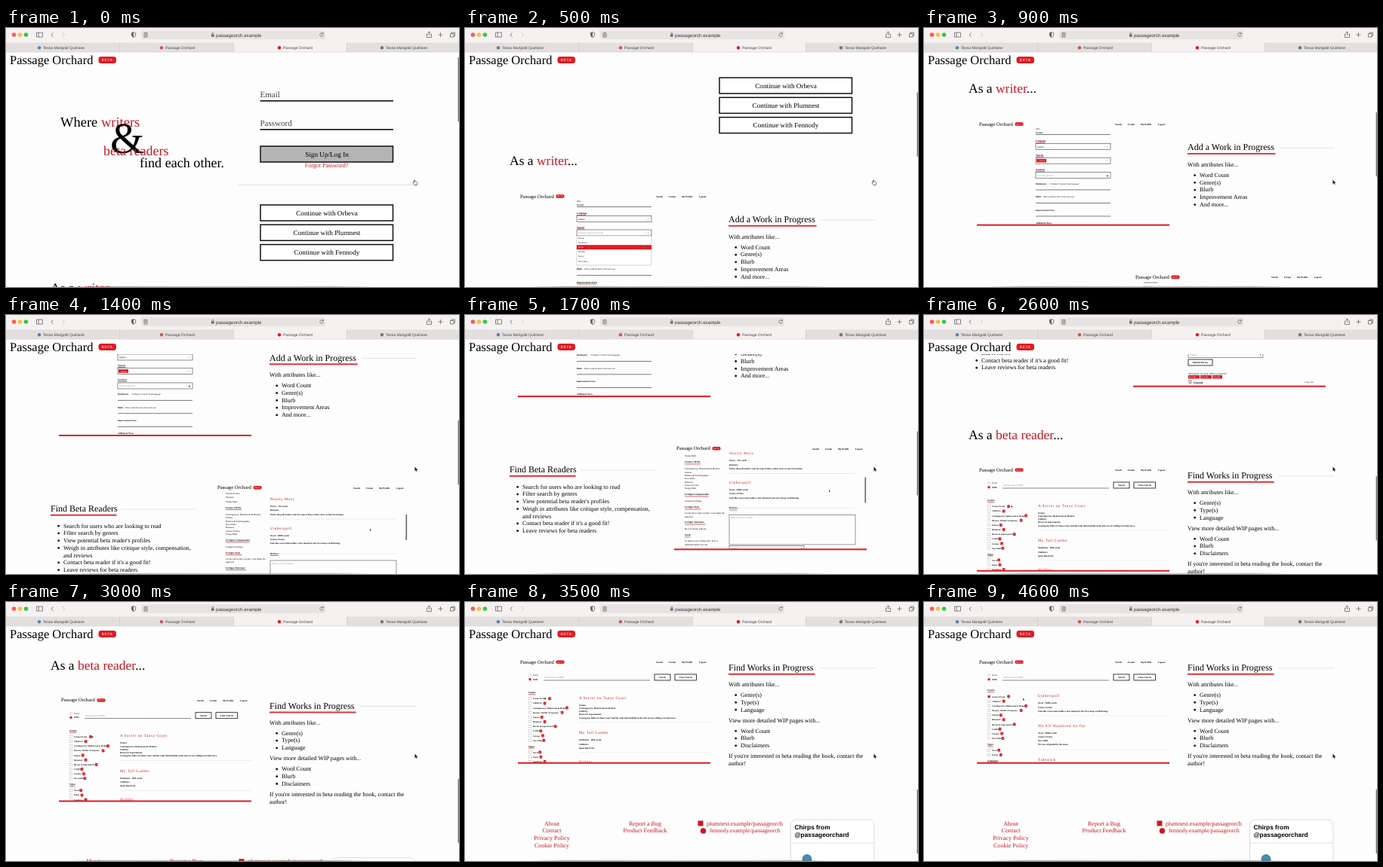
These frames come from a looping animation (600x344 px, 4700 ms). An HTML page:

```html
<!DOCTYPE html>
<html lang="en">
<head>
<meta charset="utf-8">
<title>Passage Orchard</title>
<style>
  html, body { margin: 0; width: 100%; height: 100%; overflow: hidden; background: #fdfdfd; }
  svg { display: block; width: 100vw; height: 100vh; }
  text { font-family: "Liberation Serif", serif; text-rendering: geometricPrecision; white-space: pre; }
  .ui { font-family: "Liberation Sans", sans-serif; }
  .mid { text-anchor: middle; }
  .bold { font-weight: bold; }
  .red { fill: #cb1822; }
  .title { fill: #cb1822; letter-spacing: .6px; }
  .pale { fill: #888; }
  .icon { fill: none; stroke: #666; stroke-width: .8; }
</style>
</head>
<body>
<svg id="stage" viewBox="0 0 600 344"></svg>
<script>
const RED = '#e21a23', INK = '#111', LOOP = 4700, STEP = 100;
const BRAND = 'Passage Orchard', PERSON = 'Tessa Marigold Quinlane', SITE = 'passageorch.example';

const text = (x, y, s, size = 8, cls = '', extra = '') =>
  `<text x="${x}" y="${y}" font-size="${size}" class="${cls}" ${extra}>${s.replace(/&/g, '&amp;')}</text>`;
const rect = (x, y, w, h, fill, extra = '') =>
  `<rect x="${x}" y="${y}" width="${w}" height="${h}" fill="${fill}" ${extra}/>`;
const frame = (x, y, w, h, line = .6, color = INK, fill = 'none') =>
  rect(x, y, w, h, fill, `stroke="${color}" stroke-width="${line}"`);
const rule = (x1, x2, y, color = '#ddd', w = .8) => rect(x1, y - w / 2, x2 - x1, w, color);
const dot = (x, y, r, fill, extra = '') => `<circle cx="${x}" cy="${y}" r="${r}" fill="${fill}" ${extra}/>`;
const path = (d, extra = 'class="icon"') => `<path d="${d}" ${extra}/>`;
const shift = (y, body, id = '') => `<g transform="translate(0 ${y})" ${id && `id="${id}"`}>${body}</g>`;
const rows = (x, y, step, items, draw) => items.map((s, i) => draw(x, y + i * step, s)).join('');
const tiny = (x, y, s) => text(x, y + 1, s, 3);
const tinyBold = (x, y, s) => text(x, y + 1, s, 2.9, 'bold');
const bullet = (x, y, s) => dot(x - 6.3, y - 2.3, 1.4, INK) + text(x, y, s);
const bullets = (x, y, items) => rows(x, y, 9.75, items, bullet);
const arrow = (s = 1) => `<path transform="scale(${s})" d="M0 0V6.4L1.5 5.1L2.5 7.3L3.5 6.8L2.5 4.8H4.4Z" fill="#111" stroke="#fff" stroke-width=".4"/>`;

function heading(x, y, s, width, ruleEnd) {
  return text(x, y, s, 12) + rule(x, x + width, y + 4.8, RED, 1.7) + rule(x + width + 6, ruleEnd, y - 3);
}

function label(x, y, s) {
  return text(x, y + 1, s, 3.2, 'bold') + rule(x, x + s.length * 1.5, y + 2.5, RED, .7);
}

function badge(x, y, w, h, size) {
  return rect(x, y, w, h, RED, `rx="${h * .38}"`) +
    text(x + w / 2, y + h * .7, 'BETA', size, 'ui mid', `fill="#fff" letter-spacing="${size * .18}"`);
}

// A framed recording: site header on top, clipped body below, red bar at the bottom.
function video(id, x, bottom, body) {
  const y = bottom - 132;
  const nav = [[183, 'Search'], [200, 'Forum'], [217, 'My Profile'], [240, 'Logout']];
  return `<clipPath id="${id}">${rect(x, bottom - 129, 255, 129, INK)}</clipPath>
    <g clip-path="url(#${id})">${body}</g>` +
    text(x + 3, y, BRAND, 6.7) + badge(x + 50.5, y - 4.3, 11, 4.6, 2.4) +
    nav.map(([dx, s]) => text(x + dx, y - .5, s, 3.1, 'bold')).join('') +
    rule(x, x + 255, bottom, RED, 2);
}

function formVideo() {
  const area = (y, s, hint) => tinyBold(148, y, s) + text(148 + s.length * 1.55, y + 1, hint, 2.7) + rule(148, 247, y + 8.3, '#444', .7);
  const select = (y, s, cls = '') => frame(148, y, 99, 8, .6, '#444') + text(150, y + 5, s, 2.8, cls) +
    text(239, y + 5.2, '×  ▾', 2.8, 'pale');
  const shared = tiny(148, 230, 'Title') + tinyBold(148, 235, 'Second') + rule(148, 247, 237.5, '#444', .7) +
    label(148, 246, 'Language') + select(249.5, 'English') + label(148, 264.5, 'Type(s)');
  const option = (x, y, s) => s === 'Novel'
    ? rect(148, y - 3, 99, 6, RED) + text(x, y + 1, s, 2.8, '', 'fill="#fff"') : text(x, y + 1, s, 2.8);
  const open = select(268, 'Select the type(s) of the work', 'pale') + frame(148, 276, 99, 39, .5, '#aaa', '#fff') +
    rows(150, 279, 6.1, ['Fiction', 'Nonfiction', 'Novel', 'Novella', 'Poetry', 'Short Story'], option) +
    area(320, 'Blurb', ' - What would the back of the book say?') + label(148, 337.5, 'Improvement Areas') +
    `<g transform="translate(237 289)">${arrow(.45)}</g>`;
  const closed = select(268, '') + rect(149, 269.7, 13, 4.6, RED) + text(151, 273, '× Novel', 2.7, '', 'fill="#fff"') +
    label(148, 283.5, 'Genre(s)') + select(287.5, 'Select the genre(s)', 'pale') + dot(243, 292.3, 1.3, '#888') +
    area(302.5, 'Disclaimers', ' - Profanity? Violent? Foul language?') +
    area(320, 'Blurb', ' - What would the back of the book say?') +
    area(337.5, 'Improvement Areas', '') + tinyBold(148, 354.5, 'Additional Notes');
  return video('form', 70, 526.5, shift(169, shared + `<g id="formOpen">${open}</g><g id="formClosed">${closed}</g>`));
}

function entry(x, y, title, lines, gap = 5) {
  return text(x, y + 1.7, title, 5, 'title') + rows(x, y + 9.8, gap, lines, tinyBold);
}

function profileVideo() {
  const side = rows(291, 236.5, 5.5, ['Science Fiction', "Women's", 'Young Adult'], tiny) + label(291, 256, 'Genres I Write') +
    rows(291, 265, 4.33, ['Contemporary, Mainstream & Modern', 'Fantasy', 'Memoir & Autobiography', 'New Adult', 'Romance',
      'Science Fiction', 'Young Adult'], tiny) +
    label(291, 299, 'Critique Compensation') + tiny(291, 308, 'Critique Exchange') +
    label(291, 316, 'Critique Style') + rows(291, 324, 4.2, ['Let me know what you like. I can adjust my', 'approach.'], tiny) +
    label(291, 336, 'Critique Tolerance') + tiny(291, 344.5, 'Be very honest with me.') +
    label(291, 353, 'Goals') + rows(291, 361, 4.2, ['To improve my writing skill. To be a', 'published author one day.'], tiny);
  const tags = [350, 366, 382].map(x => rect(x, 394, x > 380 ? 13 : 15, 4.5, RED) +
    text(x + 1, 397.2, 'Friendly', 2.8, '', 'fill="#fff"')).join('');
  const main = entry(350, 244, 'Nearly Moss', ['Poetry - 350 words', 'Romance', "Where the path bends I wait for some of those echoes since we have been home."], 5.4) +
    rule(350, 517, 271, '#ddd', .6) +
    entry(350, 283, 'Umberquill', ['Novel - 50000 words', 'Science Fiction', 'Feels like a slow lantern like a slow lantern by the river keeps on flickering.'], 5.2) +
    label(350, 317, 'Reviews') + rule(364, 517, 317, '#ddd', .5) +
    frame(350, 326, 167, 39.5, .6, '#555') + text(352, 331, 'Write a review for them', 3, 'pale') +
    frame(350, 367, 99, 7.5, .6, '#555') + text(352, 372, 'Type(s)', 3, 'pale') + text(445, 372, '▾', 3) +
    frame(350, 377, 32, 8, .8) + text(366, 382.2, 'Submit Review', 3.2, 'mid bold') +
    tiny(350, 396 - 9.5 + 9.5 - 4.5, '') + shift(4, text(350, 392.5, '“Honest but not mean. 100% recommend.”', 3) + tags +
      frame(351, 401, 3, 3.6, .5) + text(357, 404.5, 'Osmund', 3.4, 'bold') + text(504, 404, '19 Apr 2021', 2.5));
  return video('profile', 277, 729.7, shift(366.5, `<g id="profileBody">${side + main}</g>` +
    rect(529.5, 265, 1.6, 34, '#666', 'id="profileThumb"') + `<g transform="translate(482 284)">${arrow(.45)}</g>`));
}

function searchVideo() {
  const GENRES = ['Science Fiction', "Children's", 'Contemporary, Mainstream & Modern', 'Mystery, Thriller & Suspense', 'Fantasy',
    'Historical', 'Horror & Supernatural', 'LGBTQ+', 'Literary', 'New Adult'];
  const check = (x, y, s) => frame(x - 5.5, y - 1.7, 3.4, 3.4, .4, '#aaa', '#fff') + text(x, y + 1, s, 2.7, 'bold') +
    rect(x + 1 + s.length * 1.28, y - 2, 3.6, 4, RED, 'rx="1"') + text(x + 2.8 + s.length * 1.28, y + 1, '1', 2.6, 'mid', 'fill="#fff"');
  const sidebar = (y, types) => label(84, y, 'Genres') + rows(90, y + 8.3, 6.15, GENRES, check) +
    label(84, y + 71.5, 'Types') + rows(90, y + 79.5, 6.2, types, check);
  const bar = dot(86, 223, 1.5, '#fff', 'stroke="#aaa" stroke-width=".5"') + tiny(90, 223, 'Users') +
    dot(86, 228.7, 1.7, RED) + tinyBold(90, 228.7, 'WIPs') +
    text(105, 227, 'Search posts or WIPs', 3.1, 'pale') + rule(104, 245, 230, '#555', .7) +
    frame(251, 222, 21, 8, .8) + text(261.5, 227, 'Search', 3.1, 'mid bold') +
    frame(278, 222, 28.5, 8, .8) + text(292.2, 227, 'Clear Search', 3.1, 'mid bold');
  const before = sidebar(246, ['Novel', 'Poetry', 'Nonfiction']) +
    entry(151, 253, 'A Secret on Tansy Court', ['Fiction', 'Contemporary, Mainstream & Modern', 'LGBTQ+', 'Horror & Supernatural',
      'A young boy hides on Tansy Court and the souls that find him in the attic are not willing to let him leave.'], 4.2) +
    rule(151, 325, 286, '#ddd', .5) +
    entry(151, 299.5, 'My Tall Ladder', ['Nonfiction - 1000 words', "Children's", 'Quiet Rural Life'], 5.2) +
    rule(151, 325, 326, '#ddd', .5) + entry(151, 338, 'Hidden', []);
  const after = sidebar(243.3, ['Novel', 'Fiction']) + rect(84.8, 250.2, 2.8, 2.8, '#b01820') + label(84, 336.5, 'Languages') +
    entry(151, 250.5, 'Umberquill', ['Novel - 50000 words', 'Science Fiction', 'Feels like a slow lantern like a slow lantern by the river keeps on flickering.'], 5.4) +
    rule(151, 325, 277, '#ddd', .5) +
    entry(151, 290.5, 'We All Wandered So Far', ['Novel - 90000 words', 'Science Fiction', 'New Adult', 'We were all guided by the moon.'], 5) +
    rule(151, 325, 322, '#ddd', .5) + entry(151, 335, 'Tidewick', []);
  return video('search', 70, 974.8, shift(635, bar + `<g id="before">${before}</g><g id="after">${after}</g>
    <g id="pointer">${arrow(.5)}</g>`));
}

function pageMarkup() {
  const button = (y, s, fill = '#fff') => frame(337, y, 175.5, 21, 1.5, INK, fill) + text(425, y + 13.6, s, 9.2, 'mid');
  const field = (y, s) => text(336.5, y, s, 11, '', 'fill="#444"') + rule(336.5, 513, y + 4.8, INK, 1.6);
  const links = (x, items) => rows(x, 1057.5, 9.75, items, (a, y, s) => text(a, y, s, 8.1, 'mid red'));
  const asA = (y, s) => text(59, y, `As a <tspan class="red">${s}</tspan>...`, 17.5);
  return field(92, 'Email') + field(130, 'Password') + button(157, 'Sign Up/Log In', '#b4b4b4') +
    text(424.5, 185, 'Forgot Password?', 8, 'mid red') + rule(307, 545, 208.5) +
    button(235, 'Continue with Orbeva') + button(261.3, 'Continue with Plumnest') + button(287.6, 'Continue with Fennody') +
    text(72, 130.5, 'Where <tspan class="red">writers</tspan>', 18.5) + text(138, 165.5, '&', 58) +
    text(129, 169, 'beta readers', 18, 'red') + text(177, 185, 'find each other.', 18.1) +
    asA(351, 'writer') + formVideo() +
    heading(349, 427, 'Add a Work in Progress', 116.5, 543) + text(349, 448.7, 'With attributes like...') +
    bullets(365, 462.7, ['Word Count', 'Genre(s)', 'Blurb', 'Improvement Areas', 'And more...']) +
    heading(59, 627.5, 'Find Beta Readers', 87.5, 253) +
    bullets(76, 649, ['Search for users who are looking to read', 'Filter search by genres', "View potential beta reader's profiles",
      'Weigh in attributes like critique style, compensation,']) + text(76, 688, 'and reviews') +
    bullets(76, 697.7, ["Contact beta reader if it's a good fit!", 'Leave reviews for beta readers']) + profileVideo() +
    asA(800, 'beta reader') + searchVideo() +
    heading(349, 852, 'Find Works in Progress', 114.5, 543) + text(349, 873, 'With attributes like...') +
    bullets(365, 887, ['Genre(s)', 'Type(s)', 'Language']) + text(349, 920.6, 'View more detailed WIP pages with...') +
    bullets(365, 934.6, ['Word Count', 'Blurb', 'Disclaimers']) +
    text(349, 968.2, "If you're interested in beta reading the book, contact the") + text(349, 978, 'author!') +
    links(115, ['About', 'Contact', 'Privacy Policy', 'Cookie Policy']) + links(238.5, ['Report a Bug', 'Product Feedback']) +
    rect(308.5, 1051.5, 7, 7, '#cb1822') + text(320, 1057.5, 'plumnest.example/passageorch', 8.1, 'red') +
    dot(315.5, 1065, 3.7, '#cb1822') + text(324, 1067.2, 'fennody.example/passageorch', 7.8, 'red') +
    rect(431.5, 1050, 110.5, 120, '#fff', 'rx="7" stroke="#d5d9dc" stroke-width=".9"') +
    text(436.5, 1063.3, 'Chirps from', 8.3, 'ui bold') + text(436.5, 1073.4, '@passageorchard', 8.3, 'ui bold') +
    rule(431.5, 542, 1081, '#d5d9dc', .8) + dot(453, 1102.5, 6.5, '#4b8ba8');
}

function chromeMarkup() {
  const tab = (x, s, mark) => dot(x, 26.2, 2.2, mark) + text(x + 5, 28, s, 5, 'ui', 'fill="#444"');
  return rect(0, 32, 600, 20, '#fdfdfd') + text(5, 47.5, BRAND, 16.5) + badge(122.5, 38, 23.5, 9, 4.6) +
    rect(0, 0, 600, 32, '#f5f1f0') + rect(0, 19.5, 301, 12.5, '#e3dfde') + rect(451, 19.5, 149, 12.5, '#e3dfde') +
    [150, 301, 451].map(x => rect(x, 19.5, .7, 12.5, '#cfcaca')).join('') + rule(0, 600, 32, '#d2cecd', .6) +
    ['#fc5b57', '#fdbc40', '#34c748'].map((c, i) => dot(10.5 + i * 8, 9, 2.8, c)).join('') +
    path('M40.5 6h8v6h-8zM43.2 6v6M62.5 6.2L60 9l2.5 2.8') + path('M75 6.2L77.5 9L75 11.8', 'fill="none" stroke="#bbb" stroke-width=".8"') +
    path('M169 5.5l2.7 1v2.6q0 2.3-2.7 3.5q-2.7-1.2-2.7-3.5V6.500z') + path('M169 5.5v7.100q-2.700-1.200-2.700-3.500V6.500z', 'fill="#666"') +
    rect(179, 3.3, 244, 11.7, '#e7e3e2', 'rx="3"') +
    path('M183 6.500h4v5.500h-4zM184 8.300h2M184 10h2M420 7.600a2.300 2.300 0 1 0 .3 2M420.300 6v1.900h-1.900') +
    rect(272, 8.500, 3.600, 3, '#666') + path('M272.700 8.500v-1a1.100 1.100 0 0 1 2.200 0v1') +
    text(278, 11.5, SITE, 6.2, 'ui', 'fill="#333"') +
    path('M559 8h-1.500v4.500h6V8h-1.500M560.500 10V4.800M558.800 6.500l1.700-1.700l1.700 1.700M572.500 9h6M575.500 6v6M588.500 7.500h4.500v4.500h-4.500zM590 7.500V6h4.500v4.500h-1.500') +
    tab(44, PERSON, '#5b83a8') + tab(206, BRAND, '#c9575c') + tab(362, BRAND, RED) + tab(498, PERSON, '#777') +
    rect(598.6, 39, 1.6, 85, '#777', 'id="thumb"') +
    `<linearGradient id="shade">${['0:0', '.12:.45', '.5:.3', '.88:.4', '1:0'].map(s => s.split(':'))
      .map(([o, a]) => `<stop offset="${o}" stop-color="#666" stop-opacity="${a}"/>`).join('')}</linearGradient>` +
    rect(84, 342.8, 400, 1.2, 'url(#shade)') +
    `<g id="hand">${path('M540.5 207.500L538.800 205.300Q539 204.500 540.300 205.300V202.300Q541 201.500 541.600 202.300V204Q544.500 204 544.800 205.500V207L543.800 208.800H541.500Z', 'fill="#fff" stroke="#333" stroke-width=".7"')}</g>
     <g id="arrow" transform="translate(541.3 201.3)">${arrow()}</g>`;
}

// Monotone cubic through [time, value] points, flat at both ends.
function curve(points, t) {
  const last = points.length - 1;
  if (t <= points[0][0]) return points[0][1];
  if (t >= points[last][0]) return points[last][1];
  const slope = i => (points[i + 1][1] - points[i][1]) / (points[i + 1][0] - points[i][0]);
  const tangent = i => {
    if (i === 0 || i === last) return 0;
    const a = slope(i - 1), b = slope(i);
    return a * b > 0 ? 2 * a * b / (a + b) : 0;
  };
  const i = points.findIndex(p => p[0] > t) - 1;
  const [t0, v0] = points[i], [t1, v1] = points[i + 1];
  const h = t1 - t0, u = (t - t0) / h, w = 1 - u;
  return v0 * w * w * (1 + 2 * u) + v1 * u * u * (3 - 2 * u) + h * u * w * (tangent(i) * w - tangent(i + 1) * u);
}

const SCROLL = [[0, 0], [500, 169], [1400, 366.5], [2000, 473], [2600, 635], [3500, 761]];
const PROFILE = [[1300, 0], [1400, 0], [2000, 23.5], [2600, 49.5]];
const POINTER_X = [[2700, 115.5], [3500, 105.5], [3900, 86], [4100, 86], [4500, 131]];
const POINTER_Y = [[3500, 252.5], [4500, 253.5]];

stage.innerHTML = `<rect width="600" height="344" fill="#fdfdfd"/><g id="page">${pageMarkup()}</g>${chromeMarkup()}`;
const el = id => document.getElementById(id);
const move = (id, x, y) => el(id).setAttribute('transform', `translate(${x} ${y})`);
const show = (id, on) => el(id).setAttribute('visibility', on ? 'visible' : 'hidden');

function render(t) {
  const scroll = curve(SCROLL, t), inner = curve(PROFILE, t);
  move('page', 0, -scroll);
  move('thumb', 0, scroll * .276);
  move('profileBody', 0, -inner);
  move('profileThumb', 0, inner * .277);
  move('pointer', curve(POINTER_X, t), curve(POINTER_Y, t));
  show('formOpen', t < 900);
  show('formClosed', t >= 900);
  show('before', t < 4100);
  show('after', t >= 4100);
  show('hand', t < 700);
  show('arrow', t >= 700);
}

const start = performance.now();
function tick() {
  const t = (performance.now() - start) % LOOP;
  render(Math.floor(t / STEP) * STEP);
  requestAnimationFrame(tick);
}
tick();
</script>
</body>
</html>
```
